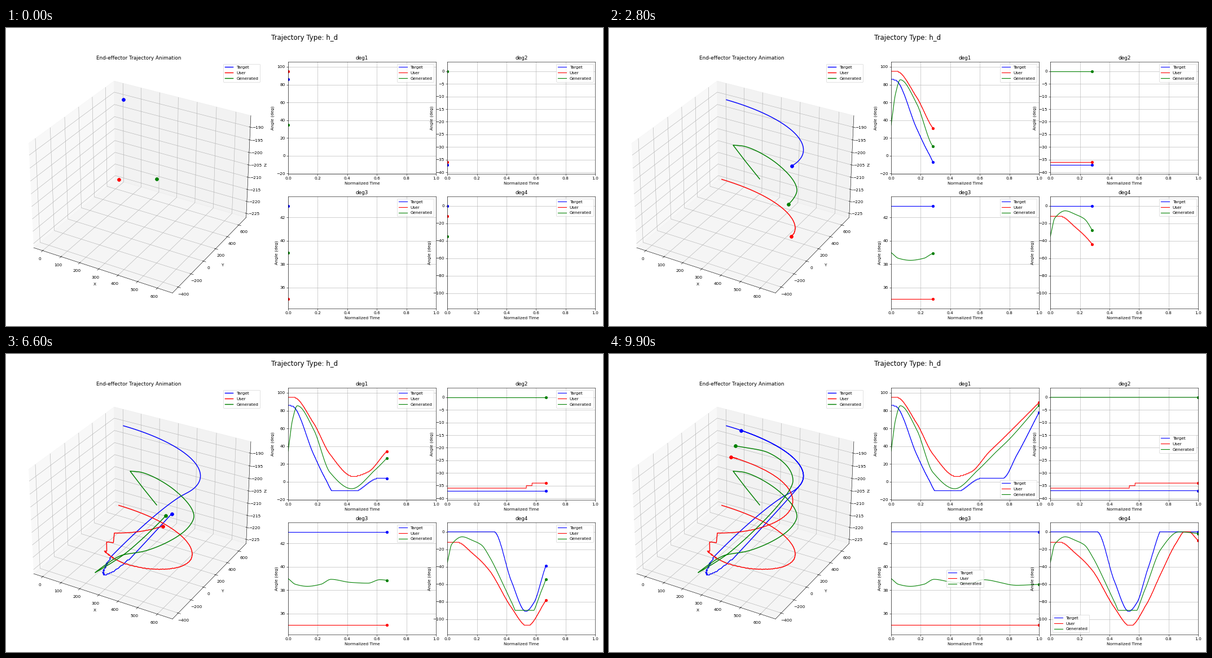
Recreate the animation shown at these times as a matplotlib script. Size 1058 px wide and 529 px high, loop 10000 ms.

```python
import numpy as np
import matplotlib.pyplot as plt
from matplotlib.animation import FuncAnimation
from matplotlib.lines import Line2D

W, H, DPI = 1058, 529, 52.9
FRAMES, INTERVAL = 100, 100
STEP = 12                                 # samples per frame
NAMES = ["Target", "User", "Generated"]
COLORS = ["blue", "red", "green"]
L1, L2 = 301, 320                         # arm link lengths

plt.rcParams["font.family"] = "DejaVu Sans"
time = np.linspace(0, 1, STEP * (FRAMES - 1) + 1)


def ease(*keys, low=-np.inf, high=np.inf):
    """Monotone cubic through (time, value) keys, held within the limits."""
    x, y = np.array(keys, float).T
    h = np.diff(x)
    s = np.diff(y) / h
    same = s[:-1] * s[1:] > 0
    total = np.where(same, s[:-1] + s[1:], 1)
    inner = np.where(same, 2 * s[:-1] * s[1:] / total, 0)
    m = np.concatenate([s[:1], inner, s[-1:]])
    i = np.clip(np.searchsorted(x, time, side="right") - 1, 0, len(h) - 1)
    u = (time - x[i]) / h[i]
    curve = ((1 + 2 * u) * (1 - u) ** 2 * y[i] + u * u * (3 - 2 * u) * y[i + 1]
             + u * (1 - u) * h[i] * ((1 - u) * m[i] - u * m[i + 1]))
    return np.clip(curve, low, high)


def const(value):
    return np.full_like(time, value)


# Recorded joints move in whole degrees, generated ones smoothly.
target = [
    ease((0, 86), (.03, 85), (.172, 31), (.25, 4), (.32, -14), (.44, -12),
         (.615, 4), (.755, 4), (.85, 30), (1, 78), low=-10).round(),
    const(-37),
    const(43),
    ease((0, 0), (.315, 0), (.434, -57), (.53, -91), (.586, -81), (.66, -42),
         (.78, 9), (1, 9), high=0).round(),
]
user = [
    ease((0, 95), (.035, 95), (.172, 66), (.283, 31), (.44, 6), (.54, 11),
         (.66, 33), (.747, 47), (1, 89)).round(),
    -36.0 + (time > .534) + (time > .573),
    const(35),
    ease((0, -12), (.065, -12), (.172, -25), (.283, -44), (.434, -87),
         (.54, -108), (.65, -83), (.747, -48), (.85, -13), (.92, 2), (1, -10),
         low=-107, high=0).round(),
]
generated = [
    ease((0, 34.5), (.03, 70), (.062, 85.5), (.172, 59), (.283, 10.5),
         (.43, -7.8), (.586, 13), (.7, 32), (.8, 48), (1, 86)),
    const(0),
    ease((0, 39), (.05, 38.5), (.13, 38.33), (.22, 38.5), (.29, 38.93),
         (.42, 38.67), (.54, 38.6), (.62, 38.9), (.85, 38.42), (1, 38.5)),
    ease((0, -35), (.03, -14), (.1, -5.7), (.172, -10), (.23, -15),
         (.283, -28), (.434, -80.5), (.48, -95), (.56, -95), (.64, -66),
         (.747, -20), (.87, 0), (1, -2), low=-90),
]
angles = [target, user, generated]


def arm(joints, base):
    """Tip of the two-link arm, tilted by deg2 + deg3."""
    d1, d2, d3, d4 = np.radians(joints)
    tilt = d2 + d3
    x = (L1 * np.cos(d1) + L2 * np.cos(d1 + d4)) * np.cos(tilt)
    y = (L1 * np.sin(d1) + L2 * np.sin(d1 + d4)) * np.cos(tilt)
    z = base + (L1 + L2 * np.cos(d4)) * np.sin(tilt)
    return np.array([x, y, z])


arm_paths = [arm(target, -254), arm(user, -212)]

# The generated path is drawn in view coordinates: time, x, y in pixels.
view_keys = np.array([
    (0, 267, 268), (.02, 246, 242), (.058, 220, 208), (.085, 234, 209),
    (.172, 298, 241), (.245, 333, 288), (.283, 318, 313), (.38, 245, 350),
    (.434, 206, 357), (.49, 158, 388), (.586, 214, 352), (.747, 326, 225),
    (.9, 282, 175), (1, 224, 163)])
view_path = np.array([ease(*view_keys[:, [0, 1]]) / W,
                      1 - ease(*view_keys[:, [0, 2]]) / H])

fig = plt.figure(figsize=(20, 10), dpi=DPI)
fig.suptitle("Trajectory Type: h_d", fontsize=16)


def box(left, top, right, bottom):
    return [left / W, 1 - bottom / H, (right - left) / W, (bottom - top) / H]


# 3D view
space = fig.add_axes(box(16, 60.2, 453.8, 498), projection="3d")
space.set(xlim=(-49, 675), ylim=(-488, 733), zlim=(-226.7, -185.5),
          xlabel="X", ylabel="Y", zlabel="Z",
          title="End-effector Trajectory Animation")
space.legend(handles=[Line2D([], [], color=c, lw=2, label=n)
                      for n, c in zip(NAMES, COLORS)], loc="upper right")
tracks = [space.plot([], [], [], color=c, lw=2)[0] for c in COLORS[:2]]
tips = [space.plot([], [], [], "o", color=c, ms=8)[0] for c in COLORS[:2]]
view_track = fig.add_artist(Line2D([], [], color="green", lw=2,
                                   transform=fig.transFigure))
view_tip = fig.add_artist(Line2D([], [], color="green", marker="o", ms=8,
                                 ls="", transform=fig.transFigure))

# Joint angle panels: limits and the frames at which the legend moves
panels = [
    ("deg1", (-20.5, 105.5), {0: "upper right", 95: "lower right"}),
    ("deg2", (-40.7, 3.7), {0: "upper right", 73: "center right"}),
    ("deg3", (34.2, 43.8), {0: "upper right", 73: "center right",
                            98: "center"}),
    ("deg4", (-117.7, 10.7), {0: "upper right", 73: "lower left"}),
]
curves, dots, legends = [], [], []
for i, (name, limits, _) in enumerate(panels):
    left, top = 500 + 282.2 * (i % 2), 60.3 + 238.8 * (i // 2)
    ax = fig.add_axes(box(left, top, left + 262, top + 198.9))
    ax.set(xlim=(0, 1), ylim=limits, title=name,
           xlabel="Normalized Time", ylabel="Angle (deg)")
    ax.grid(True)
    curves.append([ax.plot([], [], color=c, label=n)[0]
                   for n, c in zip(NAMES, COLORS)])
    dots.append([ax.plot([], [], "o", color=c)[0] for c in COLORS])
    legends.append(ax.legend(loc="upper right"))


def update(frame):
    last = STEP * frame
    seen, now = slice(0, last + 1), slice(last, last + 1)
    for track, tip, path in zip(tracks, tips, arm_paths):
        track.set_data_3d(*path[:, seen])
        tip.set_data_3d(*path[:, now])
    view_track.set_data(view_path[:, seen] if frame else ([], []))
    view_tip.set_data(view_path[:, now])
    for j, (_, _, places) in enumerate(panels):
        for curve, dot, joints in zip(curves[j], dots[j], angles):
            curve.set_data(time[seen], joints[j][seen])
            dot.set_data(time[now], joints[j][now])
        legends[j].set_loc(places[max(k for k in places if k <= frame)])
    return []


anim = FuncAnimation(fig, update, frames=FRAMES, interval=INTERVAL,
                     init_func=lambda: update(0), repeat=True, repeat_delay=0)
plt.show()
```
